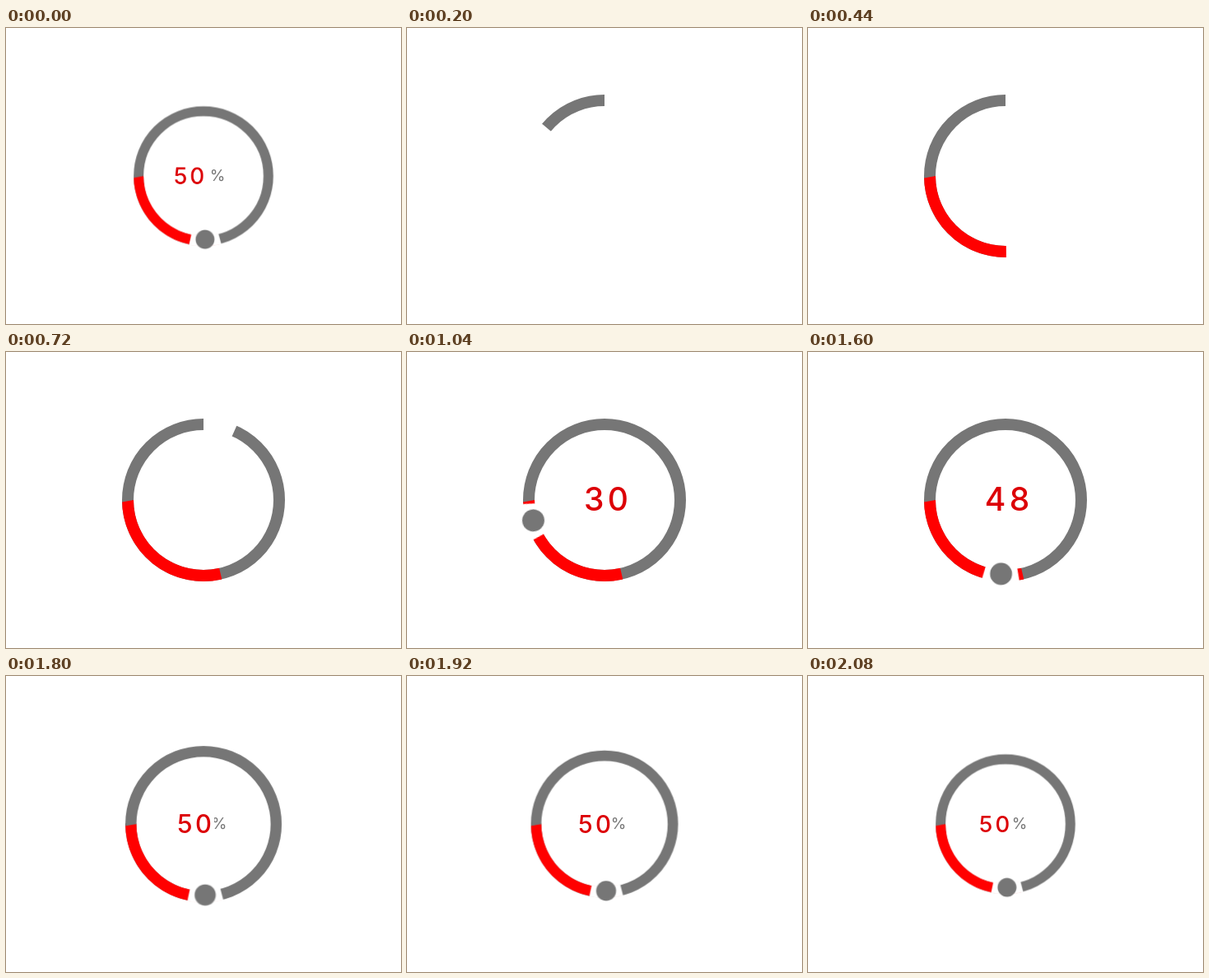
An HTML page without scripts that plays this animation: 480x360 px, repeating every 2.16 s.

```html
<!DOCTYPE html>
<html lang="en">
<head>
<meta charset="utf-8">
<title>Progress ring</title>
<style>
@property --n { syntax: "<integer>"; inherits: true; initial-value: 0; }

html, body { margin: 0; width: 100%; height: 100%; overflow: hidden; background: #fff; }
svg { position: absolute; left: 0; top: 0; }

.dial, .cover, .hand, .knob, .count, .unit { animation: 2160ms linear infinite; }

.dial { animation-name: shrink; }
.cover { stroke-dasharray: 360 360; animation-name: draw; }
.hand { animation-name: sweep, show; }
.knob { animation-name: pop; transform-origin: 0 -90px; }

.count, .unit {
  position: absolute; top: 150px; height: 60px; line-height: 60px;
  font-family: Inter, Roboto, sans-serif; text-align: center; white-space: nowrap;
}
.count {
  left: 182px; width: 120px; color: #dc0006;
  font-size: 39px; font-weight: 500; letter-spacing: .11em; text-indent: .11em;
  animation-name: tally, place, show;
}
.count::after { counter-reset: n var(--n); content: counter(n); }
.unit { left: 237px; width: 40px; color: #767676; font-size: 19px; animation-name: unit; }

/* the ring is uncovered anticlockwise from the top */
@keyframes draw {
  0%, 3.69% { stroke-dashoffset: 360; }
  3.7% { stroke-dashoffset: 0; animation-timing-function: cubic-bezier(.33,.22,.67,.63); }
  20.37% { stroke-dashoffset: 180; }
  33.333% { stroke-dashoffset: 335.5; }
  36.111%, 100% { stroke-dashoffset: 360; }
}
@keyframes shrink {
  0%, 3.69% { transform: scale(.857); }
  3.7%, 79.63% { transform: scale(1); }
  83.333% { transform: scale(.96); animation-timing-function: cubic-bezier(.33,.4,.67,.95); }
  96.296%, 100% { transform: scale(.857); }
}
@keyframes sweep {
  0%, 3.69% { transform: rotate(-181.4deg); }
  3.7%, 35.185% { transform: rotate(0deg); animation-timing-function: cubic-bezier(.33,.46,.67,.8); }
  48.148% { transform: rotate(-105.8deg); animation-timing-function: cubic-bezier(.33,.5,.67,.75); }
  62.963% { transform: rotate(-153deg); animation-timing-function: cubic-bezier(.33,.44,.67,.9); }
  78.704%, 100% { transform: rotate(-181.4deg); }
}
@keyframes tally {
  0%, 3.69% { --n: 50; }
  3.7%, 35.185% { --n: 0; animation-timing-function: cubic-bezier(.33,.46,.67,.8); }
  48.148% { --n: 30; animation-timing-function: cubic-bezier(.33,.5,.67,.75); }
  62.963% { --n: 41; animation-timing-function: cubic-bezier(.33,.44,.67,.9); }
  78.704%, 100% { --n: 50; }
}
@keyframes show {
  0%, 3.69% { opacity: 1; }
  3.7%, 35.18% { opacity: 0; }
  35.185%, 100% { opacity: 1; }
}
@keyframes pop {
  0%, 3.69% { transform: scale(1); }
  3.7%, 35.185% { transform: scale(.4); }
  38.5%, 100% { transform: scale(1); }
}
@keyframes place {
  0%, 3.69% { transform: translate(-19.5px, 0) scale(.705); }
  3.7%, 79.63% { transform: translate(0, -1.5px) scale(1); }
  83.333% { transform: translate(-13px, 0) scale(.79); }
  96.296%, 99.99% { transform: translate(-15.5px, 0) scale(.705); }
  100% { transform: translate(-19.5px, 0) scale(.705); }
}
@keyframes unit {
  0%, 3.69% { opacity: 1; transform: none; clip-path: inset(0); }
  3.7%, 81.4% { opacity: 0; transform: translateX(3px); clip-path: inset(0 0 0 24px); }
  81.481% { opacity: 1; transform: translateX(3px); clip-path: inset(0 0 0 24px); }
  83.333% { opacity: 1; transform: translateX(2px); clip-path: inset(0 0 0 15px); }
  89%, 100% { opacity: 1; transform: none; clip-path: inset(0); }
}
</style>
</head>
<body>
<svg width="480" height="360" viewBox="0 0 480 360">
  <g transform="translate(240 180)">
    <g class="dial" fill="none" stroke-width="14">
      <circle r="92" stroke="#767676"/>
      <path d="M-92 0A92 92 0 0 0 20.7 89.6" stroke="#f00"/>
      <path d="M-99-1H-85V0L-99 2.5Z" fill="#767676"/>
      <circle class="cover" r="92" pathLength="360" transform="rotate(-90)" stroke="#fff" stroke-width="17"/>
      <g class="hand">
        <path d="M-21-89.6A92 92 0 0 1 21-89.6" stroke="#fff" stroke-width="17"/>
        <circle class="knob" cy="-90" r="13.4" fill="#767676"/>
      </g>
    </g>
  </g>
</svg>
<div class="unit">%</div>
<div class="count"></div>
</body>
</html>
```
